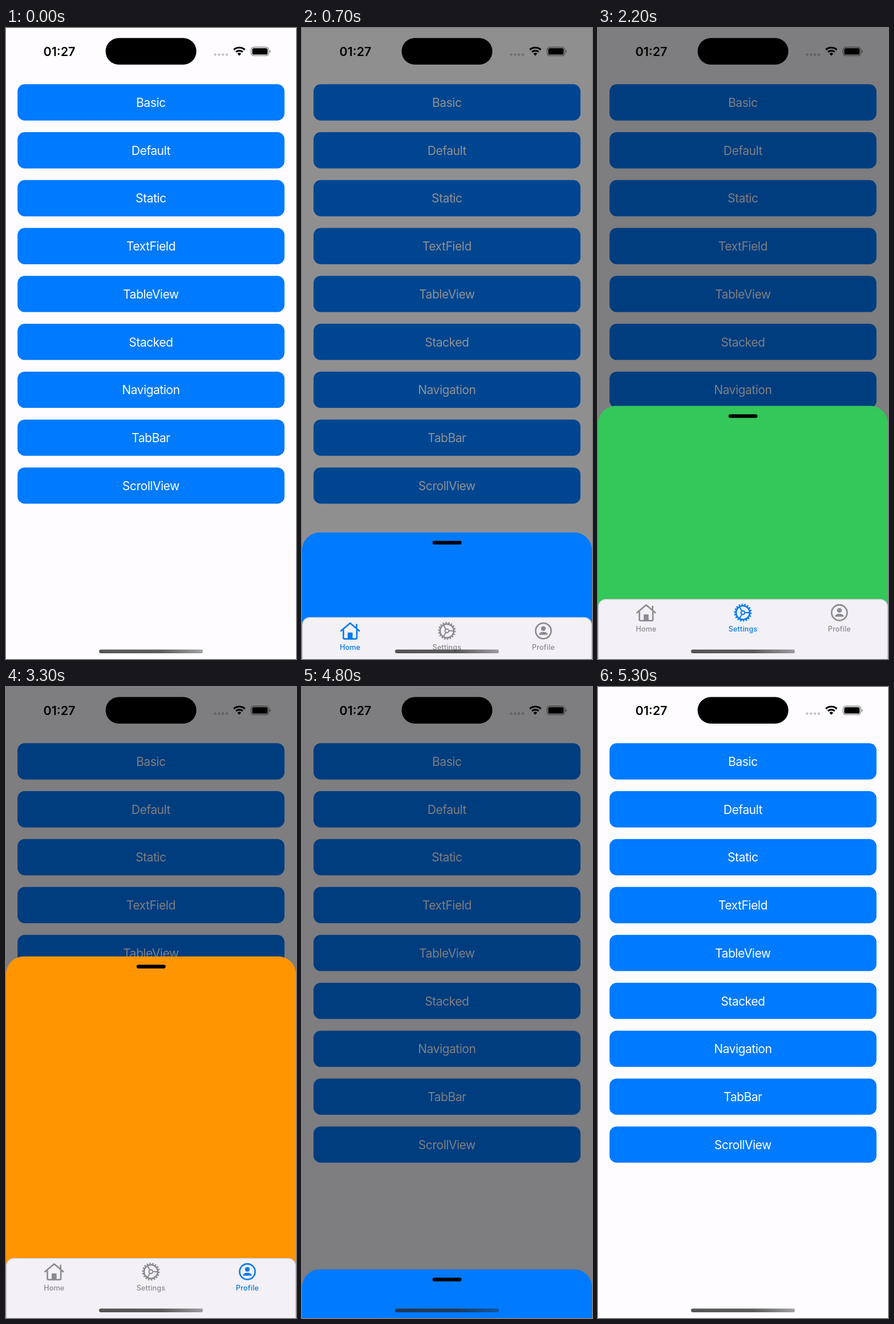
An HTML page that plays this animation: 508 px wide and 1103 px high, repeating every 5.4 s.

```html
<!DOCTYPE html>
<html lang="en">
<head>
<meta charset="utf-8">
<title>Bottom sheet with tabs</title>
<style>
  html, body { margin: 0; width: 100%; height: 100%; overflow: hidden; background: #fefcff; }
  svg { display: block; width: 100vw; height: 100vh; }
  text { font-family: Inter, Roboto, sans-serif; text-anchor: middle; }
  #buttons rect { fill: #007aff; }
  #buttons text { fill: #fff; font-size: 21px; letter-spacing: -.45px; }
  .time { font-size: 21.5px; font-weight: 600; }
  .tab { color: #8a8a8f; }
  .tab.on { color: #007aee; }
  .tab text { font-size: 12.6px; font-weight: 500; letter-spacing: .15px; fill: currentColor; }
  .line { fill: none; stroke: currentColor; stroke-width: 2.6; stroke-linecap: round; stroke-linejoin: round; }
  .solid { fill: currentColor; }
</style>
</head>
<body>
<svg viewBox="0 0 508 1103">
  <defs>
    <linearGradient id="bar">
      <stop offset="0" stop-color="#272727" stop-opacity=".78"/>
      <stop offset=".6" stop-color="#272727" stop-opacity=".75"/>
      <stop offset="1" stop-color="#272727" stop-opacity=".42"/>
    </linearGradient>
  </defs>
  <rect width="508" height="1103" fill="#fefcff"/>
  <g id="buttons"></g>
  <g fill="#c6c5c9">
    <circle cx="366.4" cy="46.5" r="2.3"/><circle cx="373.2" cy="46.5" r="2.3"/>
    <circle cx="380" cy="46.5" r="2.3"/><circle cx="386.8" cy="46.5" r="2.3"/>
  </g>
  <rect id="dim" width="508" height="1103"/>

  <text class="time" x="93.5" y="48.7">01:27</text>
  <rect x="174.5" y="17.5" width="159" height="46.5" rx="23.2"/>
  <g fill="none" stroke="#000" stroke-width="3.1">
    <path d="M399.1 38A14.3 14.3 0 0 1 418.3 38M402.7 41.9A9 9 0 0 1 414.7 41.9"/>
    <path d="M408.7 48.6L405.3 44.9A5 5 0 0 1 412.1 44.9Z" fill="#000" stroke="none"/>
  </g>
  <rect x="429.3" y="33.3" width="31" height="15.2" rx="5" fill="none" stroke="#000" stroke-opacity=".5" stroke-width="1.2"/>
  <rect x="431.3" y="35.2" width="27" height="11.4" rx="3.2"/>
  <path d="M461.8 38.5Q463.6 39.2 463.6 41T461.8 43.5Z" fill-opacity=".5"/>

  <g id="sheet">
    <rect id="body" width="508" height="700" rx="31"/>
    <rect x="228.7" y="14.6" width="50.8" height="6.4" rx="3.2"/>
  </g>
  <g id="tabs">
    <rect x=".6" y="998.6" width="506.8" height="140" rx="13" fill="#f3f0f6" stroke="#c6c4cb" stroke-width="1.3"/>
    <g class="tab" transform="translate(84.3 1022)">
      <path class="line" d="M-16 0L0 -13.5 16 0M-11.8 -2V12Q-11.8 14 -9.8 14H9.8Q11.8 14 11.8 12V-2M11.3 -11V-6"/>
      <rect class="solid" x="-4.3" y="3" width="8.6" height="11.5" rx="1"/>
      <text y="33">Home</text>
    </g>
    <g class="tab" transform="translate(253.8 1022)">
      <circle class="line" r="12"/>
      <circle class="line" r="14.3" pathLength="36" stroke-dasharray="1 1" style="stroke-linecap:butt"/>
      <circle class="line" r="3.3" style="stroke-width:2"/>
      <path class="line" style="stroke-width:2" d="M3.5 0H11.5M-1.8 -3L-6 -10M-1.8 3L-6 10"/>
      <text y="33">Settings</text>
    </g>
    <g class="tab" transform="translate(422.8 1022)">
      <circle class="line" r="13.6"/>
      <circle class="solid" cy="-4" r="4.1"/>
      <path class="solid" d="M-7.6 6.2C-7 0.6 7 0.6 7.6 6.2Q7.4 7 6.4 7H-6.4Q-7.4 7 -7.6 6.2Z"/>
      <text y="33">Profile</text>
    </g>
  </g>
  <rect x="163" y="1086.5" width="182" height="6.4" rx="3.2" fill="url(#bar)"/>
</svg>
<script>
const $ = id => document.getElementById(id);
const LOOP = 5400, STEP = 100, BASE = 253, GROW = 189.5;
const SHOW = 443, SETTINGS = 1450, PROFILE = 2250, HOME = 3350, DRAG = 4450, RELEASE = 4830, GONE = 5300;
const colors = ['#007aff', '#34c759', '#ff9500'];
const tabs = document.querySelectorAll('.tab');

$('buttons').innerHTML =
  'Basic Default Static TextField TableView Stacked Navigation TabBar ScrollView'.split(' ').map((name, i) => {
    const y = 98.3 + 83.73 * i;
    return `<rect x="20.2" y="${y}" width="467.6" height="63.4" rx="12.6"/><text x="253.8" y="${y + 39.7}">${name}</text>`;
  }).join('');

// Critically damped spring, 0 to 1, started at the given time
function spring(t, start) {
  const x = Math.max(0, t - start) * .014;
  return 1 - (1 + x) * Math.exp(-x);
}

// Distance the finger has pulled the sheet down
const pull = t => t < DRAG ? 0 : 168 * ((t - DRAG) / 350) ** 1.6;

function slideAt(t) {
  if (t >= GONE) return BASE;
  const drop = pull(Math.min(t, RELEASE));
  const out = 1 - Math.exp(-.012 * Math.max(0, t - RELEASE));
  return BASE * (1 - spring(t, SHOW)) + drop + (BASE - drop) * out;
}

function draw(t) {
  const slide = slideAt(t);
  const grow = GROW * (spring(t, SETTINGS) + spring(t, PROFILE) - 2 * spring(t, HOME));
  const active = t < SETTINGS || t >= HOME ? 0 : t < PROFILE ? 1 : 2;
  const dim = t >= GONE ? 0 : spring(t, SHOW) - spring(t, RELEASE);
  $('dim').setAttribute('opacity', dim / 2);
  $('sheet').setAttribute('transform', `translate(0 ${1103 - BASE + slide - grow})`);
  $('body').setAttribute('fill', colors[active]);
  $('tabs').setAttribute('transform', `translate(0 ${slide})`);
  tabs.forEach((tab, i) => tab.classList.toggle('on', i === active));
}

const begin = performance.now();
function tick() {
  const t = (performance.now() - begin) % LOOP;
  draw(Math.floor(t / STEP) * STEP);
  requestAnimationFrame(tick);
}
tick();
</script>
</body>
</html>
```
